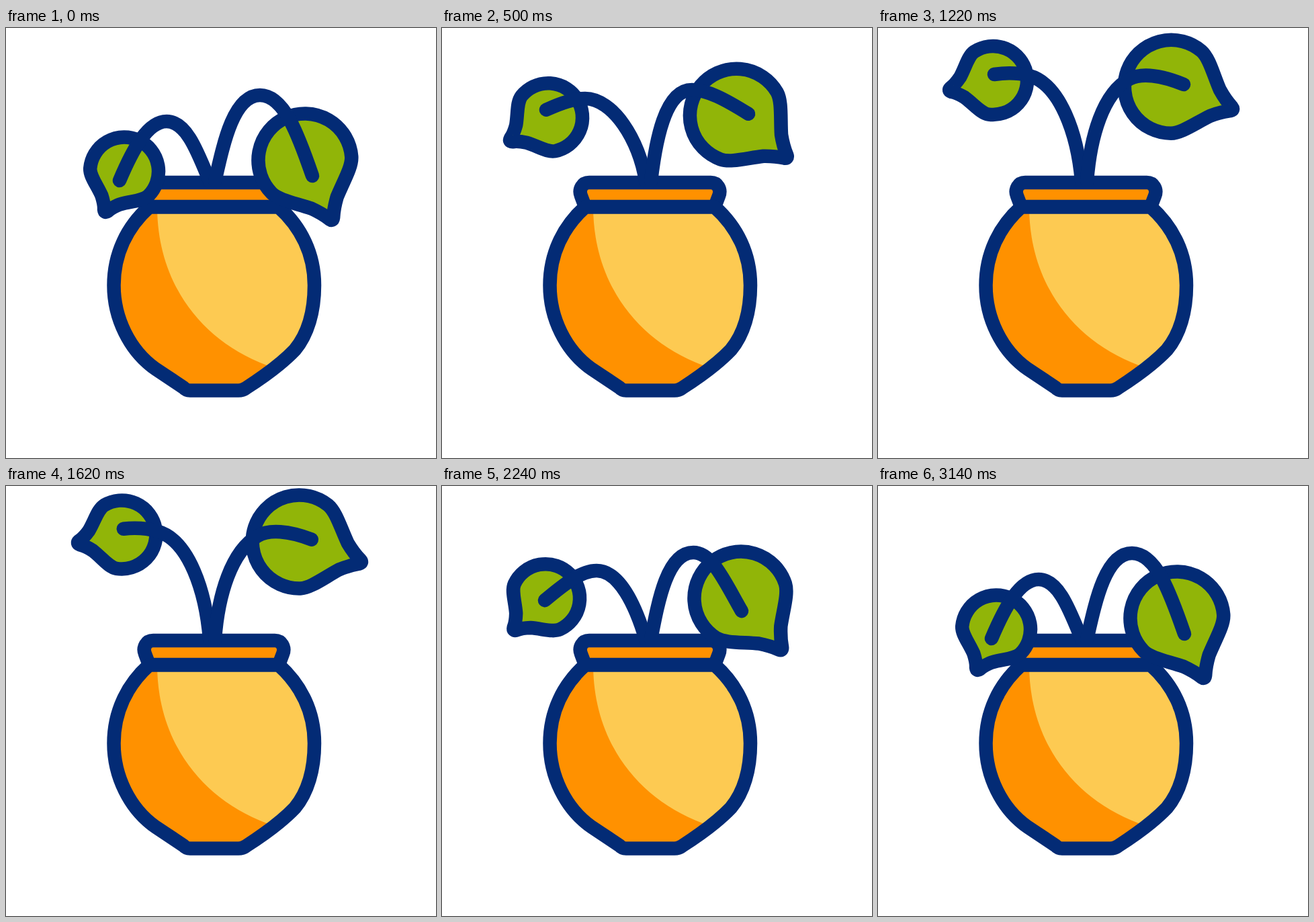
Recreate the animation shown at these times as an HTML page. Size 640 by 640 pixels, loop 3.6 s.

```html
<!DOCTYPE html>
<html lang="en">
<head>
<meta charset="utf-8">
<title>Plant in a pot</title>
<style>
  html, body { margin: 0; height: 100%; overflow: hidden; background: #fff; }
  svg { display: block; width: 100vw; height: 100vh; }
  path { fill: none; stroke: #032b75; stroke-width: 20.5; stroke-linecap: round; stroke-linejoin: round; }
  .orange { fill: #ff9100; }
  .light { fill: #fdca52; stroke: none; }
  .leaf { fill: #91b508; }
</style>
</head>
<body>
<svg viewBox="0 0 640 640">
  <path class="orange" d="M213 266L207 250C203 240 209 230 219 230H400C410 230 416 240 412 250L406 266Z"/>
  <path class="orange" stroke="none" style="stroke:none" d="M213 268C180 296 160.5 336 160.5 383C160.5 432 184 480 222 507Q240 519 264 535Q268 539.5 274 539.5H346Q352 539.5 357 536C385 518 410 500 430 479C449 456 459 422 459 383C459 336 439 296 406 268Z"/>
  <path class="light" d="M225 268C226 380 290 465 388 502L397 507L430 479C449 456 459 422 459 383C459 336 439 296 406 268Z"/>
  <path d="M213 266.5C180 296 160.5 336 160.5 383C160.5 432 184 480 222 507Q240 519 264 535Q268 539.5 274 539.5H346Q352 539.5 357 536C385 518 410 500 430 479C449 456 459 422 459 383C459 336 439 296 406 266.5Z"/>
  <g id="plant"></g>
</svg>
<script>
const LOOP = 3600;

// Pose: root bend x, bend point x y, its heading, stem end x y, its heading, leaf x y, leaf heading
const right = {
  root: [311, 228], radius: 69.5, tip: 95,
  droop: [324, 378, 100, 0, 456, 220, 71, 445, 197, 65.5],
  rise: [318, 372, 92, 0, 456, 128, 32, 438.5, 130.5, 40],
  up: [316, 374, 76, -28, 455, 84, 22, 436.5, 87.3, 20.3],
  fall: [318, 376, 91, -3, 452, 122, 31, 443.5, 110, 25.9],
  sink: [322, 374, 99, 0, 446, 186, 60, 445, 167, 51.7],
  sag: [324, 379, 100, 0, 438, 219, 77, 433.5, 203, 75.7]
};
const left = {
  root: [303, 228], radius: 51, tip: 64,
  droop: [285, 239, 139, 180, 169, 227, 113, 176, 213.5, 115.2],
  rise: [294, 213, 105, 180, 155, 122, 155, 158, 133.5, 148.4],
  up: [297, 225, 71, 195, 173, 69, 172, 171, 78, 167.3],
  fall: [295, 213, 95, 180, 162, 102, 163, 156.5, 100, 161.4],
  sink: [288, 230, 126, 180, 153, 170, 140, 154, 167, 135],
  sag: [285, 240, 139, 180, 173, 224, 107, 180.5, 217.5, 113.5]
};
const steps = [
  [0, 'droop'], [500, 'rise'], [890, 'over'], [1220, 'up'], [1380, 'rest'], [1620, 'rest'],
  [1880, 'fall'], [2240, 'sink'], [2720, 'sag'], [3140, 'droop'], [LOOP, 'droop']
];

const mix = (a, b, k) => a.map((v, i) => v + (b[i] - v) * k);
const along = (x, y, deg, len) => {
  const a = deg * Math.PI / 180;
  return [x + len * Math.cos(a), y + len * Math.sin(a)];
};

// Smooth curve through the keys that stops at turning points and holds
function sample(plant, t) {
  const pose = i => plant[steps[i][1]];
  const i = steps.findIndex((s, n) => t < steps[n + 1][0]);
  const span = steps[i + 1][0] - steps[i][0];
  const u = (t - steps[i][0]) / span;
  const rate = (n, k) => n < 0 || n > steps.length - 2 ? 0
    : (pose(n + 1)[k] - pose(n)[k]) / (steps[n + 1][0] - steps[n][0]);
  const slope = (n, k) => {
    const a = rate(n - 1, k), b = rate(n, k);
    return a * b <= 0 ? 0 : 3 * a * b / (a + b);
  };
  return pose(i).map((v, k) => {
    const ease = u * u * (3 - 2 * u);
    return v + (pose(i + 1)[k] - v) * ease
      + span * u * (1 - u) * (slope(i, k) * (1 - u) - slope(i + 1, k) * u);
  });
}

function leafPath(r, tip) {
  return `M${.34 * r} ${.94 * r}A${r} ${r} 0 1 1 ${.34 * r} ${-.94 * r}`
    + `C${.55 * r} ${-.86 * r} ${.55 * tip} ${-.56 * r} ${.73 * tip} ${-.3 * r}`
    + `C${.84 * tip} ${-.17 * r} ${.92 * tip} ${-.1 * r} ${tip} -3`
    + `Q${tip + 5} 0 ${tip} 3`
    + `C${.92 * tip} ${.1 * r} ${.84 * tip} ${.17 * r} ${.73 * tip} ${.3 * r}`
    + `C${.55 * tip} ${.56 * r} ${.55 * r} ${.86 * r} ${.34 * r} ${.94 * r}Z`;
}

function addPath(cls) {
  const p = document.createElementNS('http://www.w3.org/2000/svg', 'path');
  p.setAttribute('class', cls);
  return document.getElementById('plant').appendChild(p);
}

for (const plant of [left, right]) {
  plant.over = mix(plant.rise, plant.up, 1.16);
  plant.rest = mix(plant.rise, plant.up, 1.1);
  plant.leaf = addPath('leaf');
  plant.leaf.setAttribute('d', leafPath(plant.radius, plant.tip));
  plant.stem = addPath('stem');
}

function draw(plant, t) {
  const [bend, nx, ny, na, ex, ey, ea, lx, ly, la] = sample(plant, t);
  const [sx, sy] = plant.root;
  const d1 = Math.hypot(nx - sx, ny - sy), d2 = Math.hypot(ex - nx, ey - ny);
  plant.leaf.setAttribute('transform', `translate(${lx} ${ly}) rotate(${la})`);
  plant.stem.setAttribute('d', `M${sx} ${sy}C${bend} ${sy - .4 * d1} `
    + `${along(nx, ny, na, -.27 * d1)} ${nx} ${ny}`
    + `C${along(nx, ny, na, .25 * d2)} ${along(ex, ey, ea, -.45 * d2)} ${ex} ${ey}`);
}

const start = performance.now();
function frame() {
  const t = (performance.now() - start) % LOOP;
  draw(left, t);
  draw(right, t);
  requestAnimationFrame(frame);
}
frame();
</script>
</body>
</html>
```
